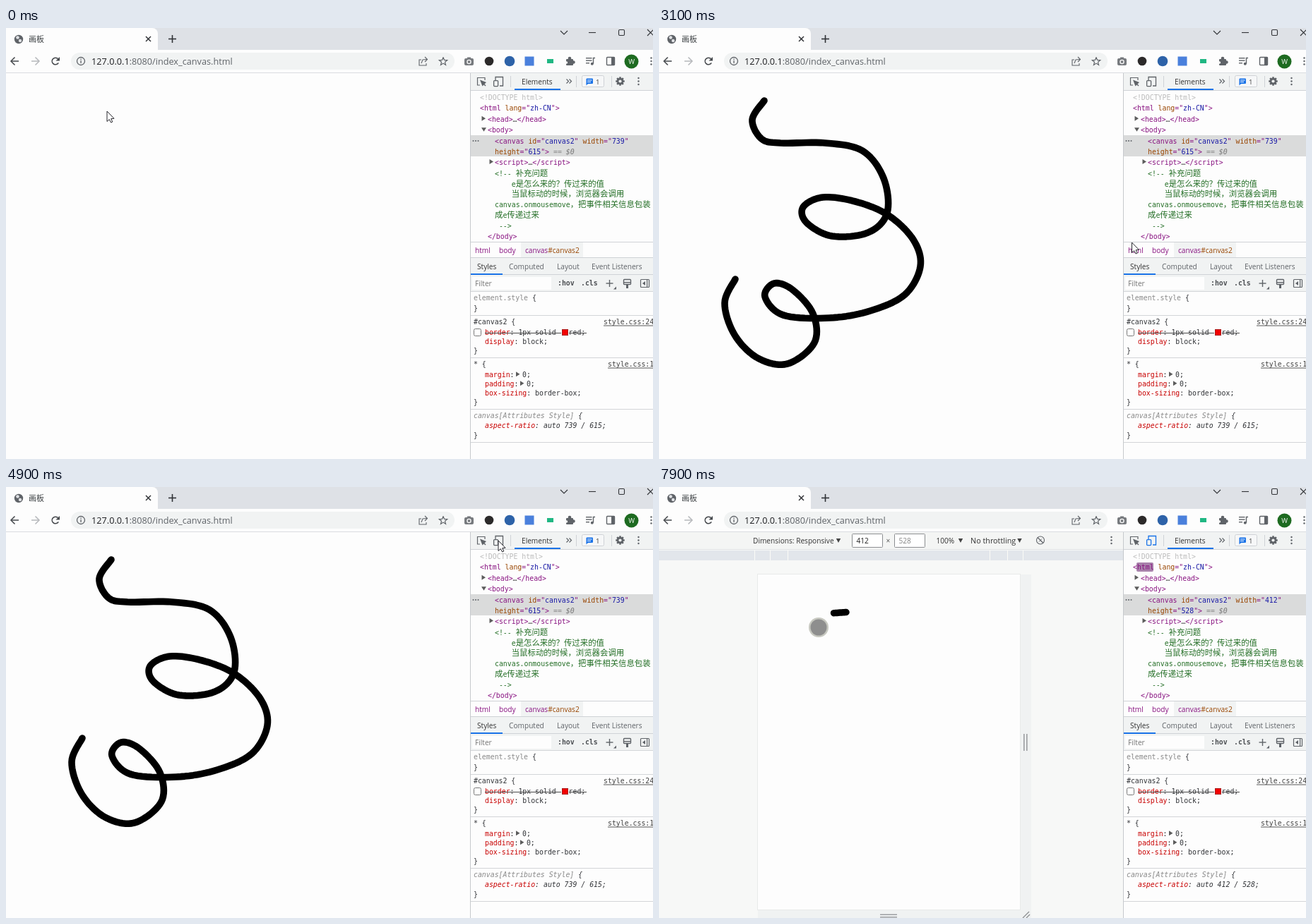
Recreate the animation shown at these times as an HTML page with a canvas. Size 916 px wide and 611 px high, loop 8 s.

```html
<!DOCTYPE html>
<html lang="zh-CN">
<head>
<meta charset="utf-8">
<title>画板</title>
<style>
html, body { margin: 0; width: 100%; height: 100%; overflow: hidden; background: #fdfdfd; }
canvas { display: block; }
</style>
</head>
<body>
<canvas id="stage" width="916" height="611"></canvas>
<script>
const c = document.getElementById('stage').getContext('2d');
const LOOP = 8000, STEP = 100;
const WHITE = '#fdfdfd', BAR = '#f1f3f3', RULE = '#cfd2d6', INK = '#5f6368', DARK = '#303236', BLUE = '#1a73e8';
const TAG = '#881280', ATTR = '#994500', VAL = '#1a1aa6', NOTE = '#236e25', PROP = '#c80000', GREY = '#888';
const UI = '"Open Sans", "Noto Sans", sans-serif';
const MONO = '"DejaVu Sans Mono", monospace';
const CJK = '"Noto Sans CJK SC", "Noto Sans CJK", sans-serif';

// Key points of the doodle; the pen passes one every PACE ms.
const doodle = [
  [149,103], [132,130], [145,157], [172,163], [235,163], [288,174], [318,213], [323,262], [296,290], [245,295],
  [209,276], [204,254], [232,240], [278,246], [324,265], [360,300], [370,338], [348,378], [299,401], [241,411],
  [176,407], [150,381], [163,362], [189,371], [218,405], [220,446], [182,476], [140,468], [107,435], [93,390], [108,356]
];
const PEN = 780, PACE = 60, LIFT = PEN + PACE * (doodle.length - 1);
// Pointer stops: time, x, y.
const stops = [
  [500, 143, 118], [PEN, 149, 103], [LIFT, 108, 356], [3300, 800, 292], [3400, 869, 107], [4000, 748, 67],
  [4500, 697, 76], [5500, 697, 76], [6300, 67, 45], [7300, 67, 45], [7700, 265, 177], [7900, 226, 199]
];

const clamp = (v, lo, hi) => Math.max(lo, Math.min(hi, v));

function pointerAt(t) {
  const i = stops.findIndex(s => t <= s[0]);
  if (i < 1) return stops[i ? stops.length - 1 : 0].slice(1);
  const a = stops[i - 1], b = stops[i], k = (t - a[0]) / (b[0] - a[0]), e = k * k * (3 - 2 * k);
  return [a[1] + (b[1] - a[1]) * e, a[2] + (b[2] - a[2]) * e];
}
// Point on the Catmull-Rom curve through pts at index n.
function along(pts, n) {
  const last = pts.length - 1, i = clamp(Math.floor(n), 0, last - 1), u = clamp(n - i, 0, 1);
  const [p, q, r, s] = [-1, 0, 1, 2].map(d => pts[clamp(i + d, 0, last)]);
  return [0, 1].map(j => q[j] + u / 2 * (r[j] - p[j] +
    u * (2 * p[j] - 5 * q[j] + 4 * r[j] - s[j] + u * (3 * (q[j] - r[j]) + s[j] - p[j]))));
}

function box(x, y, w, h, col) { c.fillStyle = col; c.fillRect(x, y, w, h); }
function round(x, y, w, h, r, fill, edge, lw = 1) {
  c.beginPath(); c.roundRect(x, y, w, h, r);
  if (fill) { c.fillStyle = fill; c.fill(); }
  if (edge) { c.strokeStyle = edge; c.lineWidth = lw; c.stroke(); }
}
function disc(x, y, r, fill, edge, lw) { round(x - r, y - r, 2 * r, 2 * r, r, fill, edge, lw); }
function line(col, lw, ...pts) {
  c.beginPath();
  pts.forEach(p => c.lineTo(p[0], p[1]));
  c.strokeStyle = col; c.lineWidth = lw; c.stroke();
}
function poly(col, ...pts) {
  c.beginPath();
  pts.forEach(p => c.lineTo(p[0], p[1]));
  c.closePath(); c.fillStyle = col; c.fill();
}
function cross(x, y, r, lw, col = DARK) {
  line(col, lw, [x - r, y - r], [x + r, y + r]);
  line(col, lw, [x + r, y - r], [x - r, y + r]);
}
function plus(x, y, r, lw, col) {
  line(col, lw, [x - r, y], [x + r, y]);
  line(col, lw, [x, y - r], [x, y + r]);
}
function dots(x, y) { for (const d of [-4.5, 0, 4.5]) disc(x, y + d, 1.2, INK); }
function arrow(x, y, down) {
  if (down) poly('#5c5c5c', [x - 3.5, y - 2.5], [x + 3.5, y - 2.5], [x, y + 3]);
  else poly('#5c5c5c', [x - 2.5, y - 3.5], [x + 3, y], [x - 2.5, y + 3.5]);
}
function text(s, x, y, col, font) {
  c.font = font; c.fillStyle = col; c.fillText(s, x, y);
  return x + c.measureText(s).width;
}
const ui = (s, x, y, col = INK, size = 10.15) => text(s, x, y, col, size + 'px ' + UI);
// Code line: parts alternate text and colour; wide characters use their own font.
function code(x, y, style, ...parts) {
  for (let i = 0; i < parts.length; i += 2)
    for (const run of parts[i].match(/[\u3000-\uffff]+|[^\u3000-\uffff]+/g))
      x = text(run, x, y, parts[i + 1], run[0] > '\u3000' ? '11.4px ' + CJK : style + ' 9.86px ' + MONO);
  return x;
}

function tabStrip() {
  box(0, 0, 916, 31, '#dee1e6');
  round(-10, 0, 225, 40, 8, WHITE);
  box(0, 31, 916, 32, WHITE);
  disc(18, 16, 6.2, INK);
  disc(16.5, 13.5, 2.3, '#dfe1e4'); disc(20, 18, 2.2, '#dfe1e4');
  text('画板', 32, 20, '#3c4043', '11px ' + CJK);
  cross(201.5, 15.5, 3.5, 1.5);
  plus(235.5, 15.5, 5.5, 1.6, DARK);
  line(DARK, 1.1, [785, 4], [790, 9], [795, 4]);
  line(DARK, 1.1, [825, 6.5], [835, 6.5]);
  round(867.5, 2.5, 8, 8, 1.5, null, DARK, 1.1);
  cross(912.5, 6.5, 4.5, 1.1);
}

function extensions() {
  round(649, 43, 13, 10, 2, '#777a7e'); box(653, 41.5, 5, 3, '#777a7e');
  disc(655.5, 48, 3.2, WHITE); disc(655.5, 48, 1.9, '#777a7e');
  disc(684, 47, 6.3, '#2c2a2a');
  disc(713, 47, 7.3, '#2d62a8');
  box(734.5, 40.5, 13, 13, '#4a80dc');
  box(766, 44, 9, 6, '#20b783');
  round(793, 44, 10, 9, 1, INK); disc(798, 43, 2.3, INK); disc(803.5, 48.5, 2.2, INK); disc(793.5, 49, 1.7, WHITE);
  for (let i = 0; i < 3; i++) box(821, 42 + 3.5 * i, i < 2 ? 8.5 : 5, 1.4, INK);
  line(INK, 1.4, [834, 42.5], [831.5, 42.5], [831.5, 50.5]); disc(829.8, 50.7, 2, INK);
  round(850.5, 41.5, 11, 11, 1, null, INK, 1.4); box(857, 41.5, 5, 11, INK);
  disc(885.5, 47.5, 10, '#1e6b21');
  ui('W', 881.2, 51, '#fff', 9.5);
  dots(913.5, 47);
}

function addressBar(loading) {
  const nav = (x, d, col) => {
    line(col, 1.5, [x - 5.5, 47], [x + 5.5, 47]);
    line(col, 1.5, [x, 41.5], [x - 5.5 * d, 47], [x, 52.5]);
  };
  nav(12.5, 1, '#45484c'); nav(41.5, -1, '#b6b8bb');
  if (loading) cross(70.5, 47.5, 4.5, 1.6, '#45484c');
  else {
    c.beginPath(); c.arc(70, 47, 4.8, .5, 5.5);
    c.strokeStyle = '#45484c'; c.lineWidth = 1.6; c.stroke();
    poly('#45484c', [76, 41], [76, 46.5], [70.5, 46.5]);
  }
  round(92, 35, 543, 24, 12, BAR);
  disc(106, 47, 5.5, null, INK, 1.3);
  box(105.4, 46, 1.3, 4, INK); box(105.4, 43.6, 1.3, 1.4, INK);
  ui(':8080/index_canvas.html', ui('127.0.0.1', 121, 51.5, '#202124', 12.7), 51.5, INK, 12.7);
  line(INK, 1.1, [588, 45], [585, 45], [585, 53], [595, 53], [595, 50]);
  line(INK, 1.1, [588, 50], [590, 45], [596, 44.5]);
  line(INK, 1.1, [593, 41], [596.5, 44.5], [593, 48]);
  const star = Array.from({ length: 11 }, (_, i) => {
    const r = i % 2 ? 2.6 : 6, a = (i * .2 - .5) * Math.PI;
    return [619 + r * Math.cos(a), 47.5 + r * Math.sin(a)];
  });
  line(INK, 1.2, ...star);
  extensions();
  box(0, 63, 916, 1, '#dadce0');
}

function devtoolsBar(mobile, hover) {
  box(658, 64, 258, 24, BAR);
  if (hover) box(720, 65, 65, 22, '#e2e5e8');
  line(INK, 1.2, [671, 81], [667.5, 81], [667.5, 70.5], [678, 70.5], [678, 74]);
  poly(INK, [671, 73.5], [680, 77], [674.5, 82.5]);
  line(INK, 1.4, [675, 78], [679, 82]);
  const col = mobile ? BLUE : INK;
  line(col, 1.3, [693, 80], [693, 69.5], [703.5, 69.5], [703.5, 82], [699, 82]);
  round(690.6, 74.6, 6, 8, 1, BAR, col, 1.3);
  for (const x of [714, 807, 857]) box(x, 68, 1, 16, RULE);
  ui('Elements', 730, 79.5, '#333');
  box(720, 86, 65, 2, BLUE);
  for (const x of [793.5, 797.5]) line(INK, 1.2, [x, 72.5], [x + 3, 75.5], [x, 78.5]);
  round(815.5, 67.5, 31, 16, 2, '#f6f7f8', RULE);
  round(821.5, 71.5, 9.5, 7.5, 1, BLUE); poly(BLUE, [821.5, 78], [825, 78], [821.5, 81.5]);
  box(823, 73.5, 6.5, 1, '#fff'); box(823, 76, 5, 1, '#fff');
  ui('1', 835, 79.5, '#444', 9.6);
  for (let i = 0; i < 4; i++) {
    const a = i * Math.PI / 4, x = 6.2 * Math.cos(a), y = 6.2 * Math.sin(a);
    line(INK, 2.6, [869.5 - x, 75.5 - y], [869.5 + x, 75.5 + y]);
  }
  disc(869.5, 75.5, 4.8, INK); disc(869.5, 75.5, 2.1, BAR);
  dots(895.5, 75.5);
  box(658, 88, 258, 1, RULE);
}

function domTree(w, h, hoverBody, flash) {
  const row = i => 102 + 15.4 * Math.min(i, 7) + 14.8 * Math.max(i - 7, 0);
  const attr = (name, value) => [name, ATTR, '="', TAG, value, VAL, '"', TAG];
  box(658, 89, 258, 214, WHITE);
  box(658, 152, 258, 30, '#dadbdb');
  if (hoverBody) round(661, 287, 260, 16, 3, '#e6eef9');
  code(671, row(0), '', '<!DOCTYPE html>', '#bcbcbc');
  if (flash) {
    c.globalAlpha = flash;
    round(676, 107, 24, 13, 2, '#97689b');
    c.globalAlpha = 1;
  }
  code(671, row(1), '', '<html ', TAG, ...attr('lang', 'zh-CN'), '>', TAG);
  arrow(676, row(2) - 4.5); code(682, row(2), '', '<head>', TAG, '…', '#444', '</head>', TAG);
  arrow(676.5, row(3) - 4.5, true); code(682, row(3), '', '<body>', TAG);
  for (let i = 0; i < 3; i++) disc(661.5 + 3.5 * i, 160, 1, INK);
  code(692, row(4), '', '<canvas ', TAG, ...attr('id', 'canvas2'), ' ', TAG, ...attr('width', w));
  const end = code(692, row(5), '', ...attr('height', h), '>', TAG, ' == ', GREY);
  code(end, row(5), 'italic', '$0', '#777');
  arrow(687, row(6) - 5); code(692, row(6), '', '<script>', TAG, '…', '#444', '<\/script>', TAG);
  [
    '<!-- 补充问题', '    e是怎么来的？传过来的值', '    当鼠标动的时候，浏览器会调用',
    'canvas.onmousemove，把事件相关信息包装', '成e传递过来', ' -->'
  ].forEach((s, i) => code(692, row(7 + i), '', s, NOTE));
  code(682, row(13), '', '</body>', TAG);

  box(658, 303, 258, 1, RULE);
  box(658, 304, 258, 21, WHITE); box(729, 304, 88, 21, BAR);
  ui('html', 664, 318.5, TAG); ui('body', 698, 318.5, TAG);
  ui('#canvas2', ui('canvas', 735, 318.5, TAG), 318.5, ATTR);
}

function stylesBar() {
  box(658, 325, 258, 49, BAR); box(658, 325, 258, 1, RULE);
  ui('Styles', 667, 341.5, '#333');
  ui('Computed', 712, 341.5); ui('Layout', 780, 341.5); ui('Event Listeners', 829, 341.5);
  box(658, 349, 258, 1, RULE); box(658, 348, 45, 2, BLUE);
  box(660, 353, 112, 18, WHITE);
  ui('Filter', 664, 366, '#757575');
  code(781, 365, 'bold', ':hov', '#4d5054'); code(814, 365, 'bold', '.cls', '#4d5054');
  plus(854.5, 362, 5, 1.4, INK);
  poly(INK, [864, 366.5], [864, 370.5], [860, 370.5]);
  round(874.5, 356.5, 10, 7, 1, null, INK, 1.4); box(874, 360, 11, 1.4, INK); box(878, 364, 3, 5, INK);
  round(898.5, 356.5, 12, 11, 1, null, INK, 1.2); box(907, 357, 1.2, 10, INK);
  poly(INK, [905, 359], [905, 365], [901, 362]);
}

function styles(w, h) {
  box(658, 374, 258, 237, WHITE);
  for (const y of [373, 407, 467, 540, 587]) box(658, y, 258, 1, '#d3d5d8');
  const close = y => code(662, y, '', '}', DARK);
  const rule = (y, name, value, style = '') => code(678, y, style, name, PROP, ': ' + value + ';', DARK);
  const short = (y, name) => {
    const x = code(678, y, '', name, PROP, ':', DARK);
    arrow(x + 5, y - 3.7); code(x + 11.5, y, '', '0;', DARK);
  };
  const link = (s, x, y) => { code(x, y, '', s, '#444'); box(x, y + 1.5, 75, 1, '#555'); };

  code(662, 386, '', 'element.style ', GREY, '{', DARK); close(400.5);
  code(662, 420, '', '#canvas2 {', DARK); link('style.css:24', 846, 420);
  round(662.5, 426.5, 10, 10, 2, '#fff', '#777');
  code(678, 435.3, '', 'border', PROP, ': 1px solid   red;', DARK);
  box(678, 432, 144, 1, '#4a4a4a');
  box(786, 427, 11, 9, WHITE); box(787, 427, 9, 9, '#8b2020'); box(787.7, 427.7, 7.6, 7.6, '#f20000');
  rule(448, 'display', 'block'); close(461);
  code(662, 480, '', '* {', DARK); link('style.css:1', 852, 480);
  short(494.5, 'margin'); short(507.5, 'padding');
  rule(520.8, 'box-sizing', 'border-box'); close(533.5);
  code(662, 553, 'italic', 'canvas[Attributes Style] ', GREY, '{', DARK);
  rule(567.3, 'aspect-ratio', 'auto ' + w + ' / ' + h, 'italic');
  close(580.5);
}

function stroke(pts, n, lw) {
  const path = [];
  for (let i = 0; i < n; i += .1) path.push(along(pts, i));
  c.lineJoin = c.lineCap = 'round';
  line('#000', lw, ...path, along(pts, n));
  c.lineJoin = 'miter'; c.lineCap = 'butt';
}

function deviceFrame() {
  const drop = x => poly('#444', [x - 3.2, 73], [x + 3.2, 73], [x, 79]);
  const field = (s, x, col) => {
    round(x + .5, 66.5, 43, 19, 1, '#fff', '#8b8d90');
    ui(s, x + 6.5, 79.5, col);
  };
  box(0, 64, 657, 547, '#f7f8f7');
  box(0, 64, 657, 25, '#f4f5f4'); box(0, 88, 657, 1, '#e0e2e4');
  ui('Dimensions: Responsive', 133, 79.5, '#333'); drop(254);
  field('412', 273, '#222'); ui('×', 321.5, 80, '#555'); field('528', 333, '#858585');
  ui('100%', 392.5, 79.5, '#333'); drop(427);
  ui('No throttling', 441, 79.5, '#333', 10.8); drop(510.5);
  disc(540, 75.5, 5.5, null, INK, 1.1);
  line(INK, 1.2, [536, 71.5], [544, 79.5]);
  line(INK, 1, [538, 77.5], [542, 73.5]);
  dots(640.5, 75.5);
  box(0, 90, 657, 14, '#e2e6eb');
  for (const d of [143, 168, 190]) for (const s of [-1, 1]) box(325 + s * d, 90, 1, 14, '#fbfbf7');
  box(511, 124, 16, 476, '#f0f2f2'); box(140, 600, 387, 11, '#f0f2f2');
  box(139, 123, 373, 477, '#e8eae9'); box(140, 124, 371, 475, WHITE);
  for (const x of [516, 520]) box(x, 350, 1.6, 24, '#9c9ea1');
  for (const y of [605.5, 609]) box(313, y, 24, 1.5, '#9c9ea1');
  line('#8c8e91', 1.2, [515, 611], [524, 602]); line('#8c8e91', 1.2, [520, 611], [525, 606]);
}

function highlight() {
  box(0, 64, 657, 547, 'rgba(111,168,220,.66)');
  c.shadowColor = 'rgba(0,0,0,.35)'; c.shadowBlur = 4;
  round(-4, 590, 110, 30, 2, '#fff');
  c.shadowBlur = 0; c.shadowColor = 'transparent';
  text('body', 3, 608, TAG, 'bold 10.8px ' + UI);
  ui('739.2 × 615', 39.5, 608, '#777', 10.3);
}

function pointer(x, y) {
  const p = [[0, 0], [0, 14.5], [3.3, 11.6], [5.6, 16], [7.8, 15], [5.7, 10.7], [10, 10.3]].map(q => [x + q[0], y + q[1]]);
  poly('#fff', ...p);
  line('#26262c', 1, ...p, p[0]);
}

function draw(t) {
  const mobile = t >= 5100, cleared = t >= 7100, updated = t >= 7400;
  const over = t >= 3300 && t < 3500, drawing = t >= PEN && t < LIFT;
  const n = clamp((t - PEN) / PACE, 0, doodle.length - 1);
  const [x, y] = drawing ? along(doodle, n + .6) : pointerAt(t);
  const size = updated ? ['412', '528'] : ['739', '615'];

  box(0, 0, 916, 611, WHITE);
  if (mobile) deviceFrame();
  if (t >= PEN && !cleared) {
    c.save();
    if (mobile) { c.translate(144.5, 90); c.scale(.554, .554); }
    stroke(doodle, n, 9.6);
    c.restore();
  }
  if (t >= 7800) stroke([[265, 177.5], [247.5, 178.7]], (t - 7700) / 200, 9.5);
  if (over) highlight();

  tabStrip();
  addressBar(t >= 7000 && t < 7300);
  box(657, 64, 1, 547, '#c6c9cd');
  devtoolsBar(mobile, x > 720 && x < 785 && y > 63 && y < 88);
  domTree(...size, over, updated ? 1 - (t - 7400) / 3000 : 0);
  stylesBar();
  styles(...size);

  if (mobile && x > 140 && x < 511 && y > 124) {
    disc(x, y, 14, 'rgba(170,172,160,.65)');
    disc(x, y, 11.5, '#8e8e8e');
  } else pointer(x, y);
}

const start = performance.now();
function tick() {
  const t = (performance.now() - start) % LOOP;
  draw(Math.floor(t / STEP) * STEP);
  requestAnimationFrame(tick);
}
tick();
</script>
</body>
</html>
```
